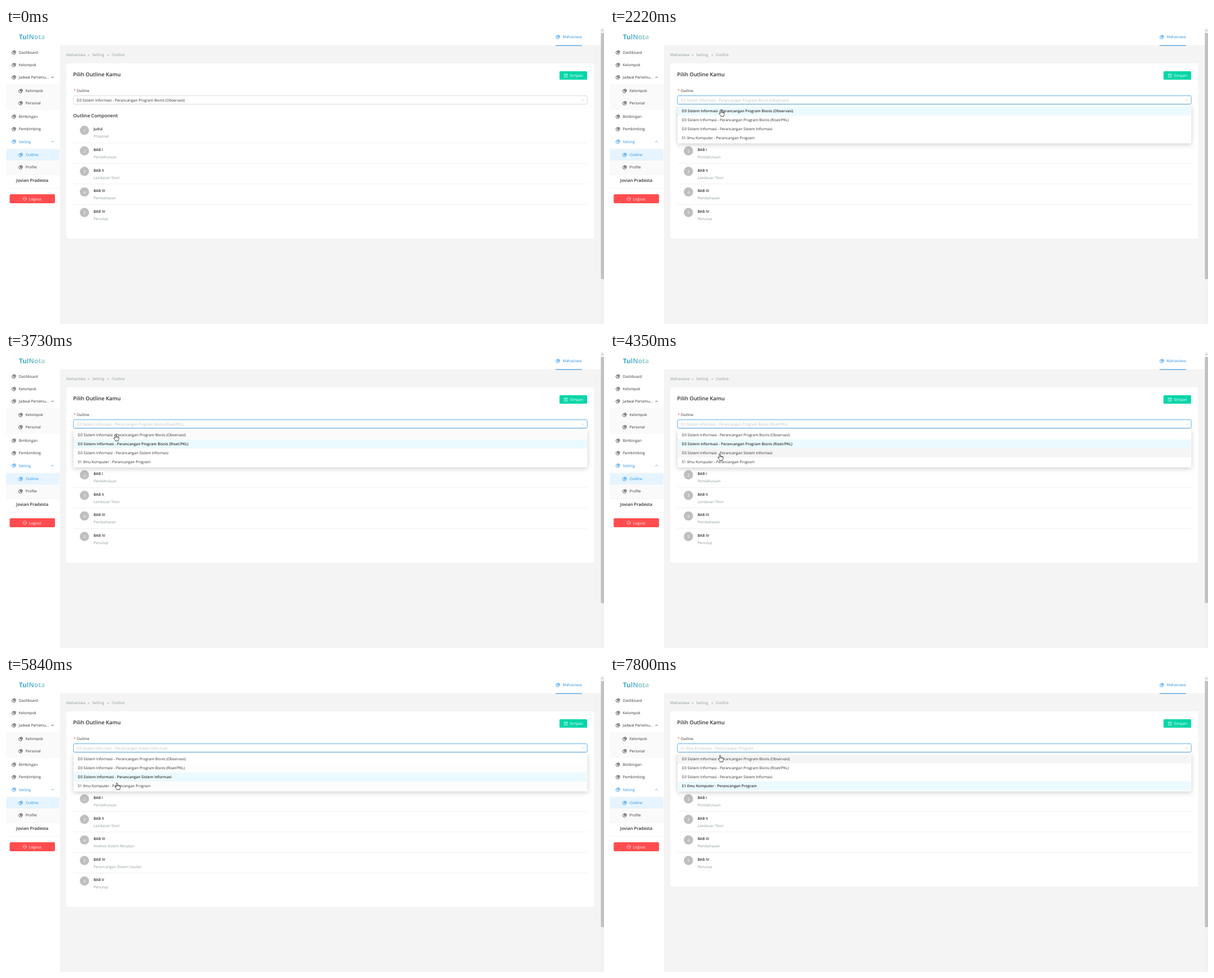
Write an HTML page that moves like this. It is 1062 by 527 pixels and loops after 8000 ms.

```html
<!DOCTYPE html>
<html lang="id">
<head>
<meta charset="utf-8">
<title>Outline</title>
<style>
html, body { margin: 0; width: 100%; height: 100%; overflow: hidden; background: #f4f4f4; }
svg { display: block; width: 1062px; height: 527px; }
text { font: 6.6px "Open Sans", "Noto Sans", sans-serif; fill: #303030; text-rendering: geometricPrecision; white-space: pre; }
#menu { filter: drop-shadow(0 2px 4px rgba(0, 0, 0, .2)); }
</style>
</head>
<body>
<svg id="stage" viewBox="0 0 1062 527">
  <defs>
    <linearGradient id="brand"><stop stop-color="#2f9fd0"/><stop offset="1" stop-color="#a9d8cf"/></linearGradient>
    <g id="pie" fill="none" stroke="currentColor" stroke-width=".8">
      <path d="M-.6-2.8A3.1 3.1 0 1 0 2.8.7H-.6Z"/>
      <path d="M.7-3.4V-.6H3.5A2.9 2.9 0 0 0 .7-3.4Z"/>
    </g>
  </defs>
</svg>
<script>
const NS = 'http://www.w3.org/2000/svg';
const stage = document.getElementById('stage');
const BLUE = '#1f8fe8', INK = '#303030', MUTED = '#8f9b9b';

function add(tag, attrs, parent = stage) {
  const el = document.createElementNS(NS, tag);
  for (const k in attrs) el.setAttribute(k, attrs[k]);
  return parent.appendChild(el);
}
const rect = (x, y, width, height, fill, rx = 0, parent) =>
  add('rect', { x, y, width, height, fill, rx }, parent);
const line = (d, stroke, width = .8, parent) =>
  add('path', { d, stroke, 'stroke-width': width, fill: 'none' }, parent);
function label(x, y, str, { fill = INK, size = 6.6, weight = 400, anchor = 'start' } = {}, parent) {
  const el = add('text', { x, y, 'text-anchor': anchor }, parent);
  el.style.cssText = `fill:${fill};font-size:${size}px;font-weight:${weight}`;
  el.textContent = str;
  return el;
}
const pie = (x, y, color) =>
  add('use', { href: '#pie', transform: `translate(${x} ${y})`, color });

const options = [
  'D3 Sistem Informasi - Perancangan Program Bisnis (Observasi)',
  'D3 Sistem Informasi - Perancangan Program Bisnis (Riset/PKL)',
  'D3 Sistem Informasi - Perancangan Sistem Informasi',
  'S1 Ilmu Komputer - Perancangan Program'
];
const titles = ['Judul', 'BAB I', 'BAB II', 'BAB III', 'BAB IV', 'BAB V'];
const shortPlan = ['Proposal', 'Pendahuluan', 'Landasan Teori', 'Pembahasan', 'Penutup'];
const longPlan = ['Proposal Judul', 'Pendahuluan', 'Landasan Teori',
  'Analisis Sistem Berjalan', 'Perancangan Sistem Usulan', 'Penutup'];

// Page frame, header and sidebar
rect(0, 0, 1062, 527, '#f4f4f4');
rect(0, 0, 1056, 31, '#fff');
rect(0, 0, 96.5, 527, '#fff');
line('M97 31.3H1056M96.5 31V527', '#eee', .6);
label(23, 20.3, 'TulNota', { fill: 'url(#brand)', size: 11.7, weight: 700 });
pie(980, 16, BLUE);
label(988.5, 18.4, 'Mahasiswa', { fill: BLUE });
line('M976 31.2H1023', '#1f86d8', 1);

rect(0, 99.5, 96, 46.5, '#fafafa');
rect(0, 213.5, 96, 47, '#fafafa');
rect(0, 216, 94.5, 20, '#e6f4ff', 1.5);
line('M0 261H96M0 285.5H96', '#f0f0f0', .7);
[
  ['Dashboard', 43.5], ['Kelompok', 65.8], ['Jadwal Pertemu...', 87.8],
  ['Kelompok', 112, 1], ['Personal', 133.8, 1], ['Bimbingan', 157.8],
  ['Pembimbing', 180], ['Setting', 202.2, 0, BLUE],
  ['Outline', 226, 1, BLUE], ['Profile', 248, 1]
].forEach(([name, y, nested = 0, fill = INK]) => {
  pie(14 + 12 * nested, y, fill);
  label(22.8 + 12 * nested, y + 2.4, name, { fill });
});
line('M80.5 89 82.6 86.8 84.7 89', INK);
line('M80.5 203.3 82.6 201.1 84.7 203.3', BLUE);
label(46.7, 273.7, 'Jovian Pradesta', { size: 7.7, weight: 600, anchor: 'middle' });
rect(6.5, 296, 80.5, 16, '#ff4d4f', 2);
line('M35.6 302A3 3 0 1 0 35.6 306M33 304H37M35.9 302.8 37.1 304 35.9 305.2', '#fff', .7);
label(41, 306.5, 'Logout', { fill: '#fff', size: 6.7 });

rect(1056, 0, 6, 527, '#f1f1f1');
rect(1056.5, 9, 5.5, 438, '#c1c1c1');
line('M1057.6 5.2 1059.2 3.6 1060.8 5.2', '#777');

[['Mahasiswa', 107], ['»', 145], ['Setting', 153], ['»', 180], ['Outline', 188]]
  .forEach(([str, x]) => label(x, 50.1, str, { fill: MUTED }));

// Card with select box
const card = rect(107.3, 63, 937.2, 312, '#fff', 3);
label(119.3, 85.8, 'Pilih Outline Kamu', { size: 9.4, weight: 600 });
rect(983, 77, 49, 15, '#06d6a8', 1.5);
line('M991.4 82H997V87.6H991.4ZM992.8 82V83.8H995.6V82M993 86H995.4', '#fff', .6);
label(1001.3, 87.4, 'Simpan', { fill: '#fff', size: 6.7 });
label(120, 114, '*', { fill: '#ff4d4f', size: 7 });
label(125.4, 113.5, 'Outline');
const box = rect(119.8, 120.6, 912.4, 15, '#fff', 2);
box.setAttribute('stroke-width', .9);
const chosen = label(125.8, 131, '');
line('M1021.9 127.3 1024.2 129.6 1026.5 127.3', '#bfbfbf', .7);
label(119.3, 158.5, 'Outline Component', { size: 8.35, weight: 600 });

// Component list
const steps = titles.map((title, i) => {
  const y = i * 36.56, g = add('g', {});
  if (i) line(`M119.5 ${168 + y}H1032`, '#ededed', .8, g);
  add('circle', { cx: 139.3, cy: 182.2 + y, r: 8.2, fill: '#bfbfbf' }, g);
  label(139.3, 185 + y, i + 1, { fill: '#fff', anchor: 'middle' }, g);
  label(155.4, 182.4 + y, title, { weight: 600 }, g);
  return { g, note: label(155.4, 195.4 + y, '', { fill: MUTED }, g) };
});

// Dropdown
const menu = add('g', { id: 'menu' });
rect(120, 137.8, 912.3, 67.6, '#fff', 2, menu);
const rows = options.map((str, i) => {
  const y = 139.7 + 16 * i;
  return { bg: rect(120.3, y, 911, 16, '#f5f5f5', 0, menu), text: label(127.5, y + 10.4, str, {}, menu) };
});

// Pointers, both with the hot spot at the origin
const pen = { fill: '#fff', stroke: '#222', 'stroke-width': .8, 'stroke-linejoin': 'round' };
const arrow = add('path', { ...pen, d: 'M0 0V8.8L2 7 3.5 10.3 4.9 9.7 3.5 6.5H6.2Z' });
const hand = add('path', { ...pen,
  d: 'M-1 1Q0-.6 1 1V4.4Q2 3.6 2.9 4.7 3.9 4 4.6 5.1 6 4.9 6 6.3V8.6Q5.6 10 5 10.8V12.3H-.3V11.2Q-2 9.4-3.3 7.2-3.3 5.6-1.9 6.3L-1 7.3ZM1 4.4V6.5M2.9 4.7V6.7M4.6 5.1V6.9' });

// Each opening: time opened, time an option is picked, option picked
const visits = [[1530, 2800, 1], [3550, 4400, 2], [5480, 6360, 3], [7510, 9000, 3]];
const path = [
  [720, 215, 429], [1400, 200, 128], [1560, 199, 127], [1900, 198, 140], [2220, 197, 145],
  [2420, 196, 155], [2640, 196, 157.5], [2860, 196, 157.5], [3400, 194, 128], [3600, 194, 127],
  [3730, 194.5, 146], [4000, 196, 207], [4200, 195, 181], [4420, 195, 181], [4830, 193.5, 138],
  [5230, 193.5, 138], [5400, 195, 128], [5520, 195, 128], [5840, 197, 190], [6110, 197, 193],
  [6360, 197, 193], [6800, 194.2, 188.6], [7310, 194.2, 188.6], [7480, 195, 127],
  [7540, 195, 127], [7640, 195.5, 140.6], [8000, 195.5, 140.6]
];
const clamp = v => Math.min(1, Math.max(0, v));

function pointer(t) {
  const i = path.findIndex(p => p[0] > t);
  if (i < 1) return path[i < 0 ? path.length - 1 : 0].slice(1);
  const [t0, x0, y0] = path[i - 1], [t1, x1, y1] = path[i];
  const u = (t - t0) / (t1 - t0), e = u * u * (3 - 2 * u);
  return [x0 + (x1 - x0) * e, y0 + (y1 - y0) * e];
}

// 0 = closed, 1 = fully open
function openness(t) {
  const v = visits.findLast(v => t >= v[0]);
  if (!v) return 0;
  return t < v[1] ? 1 - (1 - clamp((t - v[0]) / 210)) ** 4 : 1 - clamp((t - v[1]) / 200) ** 3;
}

function hover(t, row) {
  let sum = 0;
  for (let k = 0; k < 8; k++) {
    const s = t - k * 20, over = Math.floor((pointer(s)[1] - 139.7) / 16);
    if (over === row && openness(s) > .3) sum++;
  }
  return sum / 8;
}

function draw(t) {
  const picked = visits.filter(v => t >= v[1]).pop();
  const value = picked ? picked[2] : 0;
  const active = visits.some(v => t >= v[0] && t < v[1]);
  const open = openness(t);
  const plan = value === 2 ? longPlan : shortPlan;

  box.setAttribute('stroke', t > 1340 ? '#4aa5e8' : '#d6d6d6');
  chosen.textContent = options[value];
  chosen.style.fill = active ? '#bfbfbf' : INK;
  card.setAttribute('height', plan.length === 6 ? 348 : 312);
  steps.forEach(({ g, note }, i) => {
    g.style.display = i < plan.length ? '' : 'none';
    note.textContent = plan[i] || '';
  });

  menu.style.display = open > 0 ? '' : 'none';
  menu.style.opacity = open;
  const scale = .8 + .2 * open;
  menu.setAttribute('transform', `translate(0 ${137.8 * (1 - scale)}) scale(1 ${scale})`);
  rows.forEach(({ bg, text }, i) => {
    const on = i === value;
    bg.setAttribute('fill', on ? '#ebfafe' : '#f5f5f5');
    bg.setAttribute('opacity', on ? 1 : hover(t, i));
    text.style.fontWeight = on ? 600 : 400;
  });

  const [x, y] = pointer(t);
  const link = (y > 120 && y < 136.5) || (open > 0 && y > 136 && y < 206);
  for (const [el, shown] of [[arrow, !link], [hand, link]]) {
    el.style.display = t >= 720 && shown ? '' : 'none';
    el.setAttribute('transform', `translate(${x} ${y})`);
  }
}

function tick() {
  draw(performance.now() % 8000);
  requestAnimationFrame(tick);
}
tick();
</script>
</body>
</html>
```
